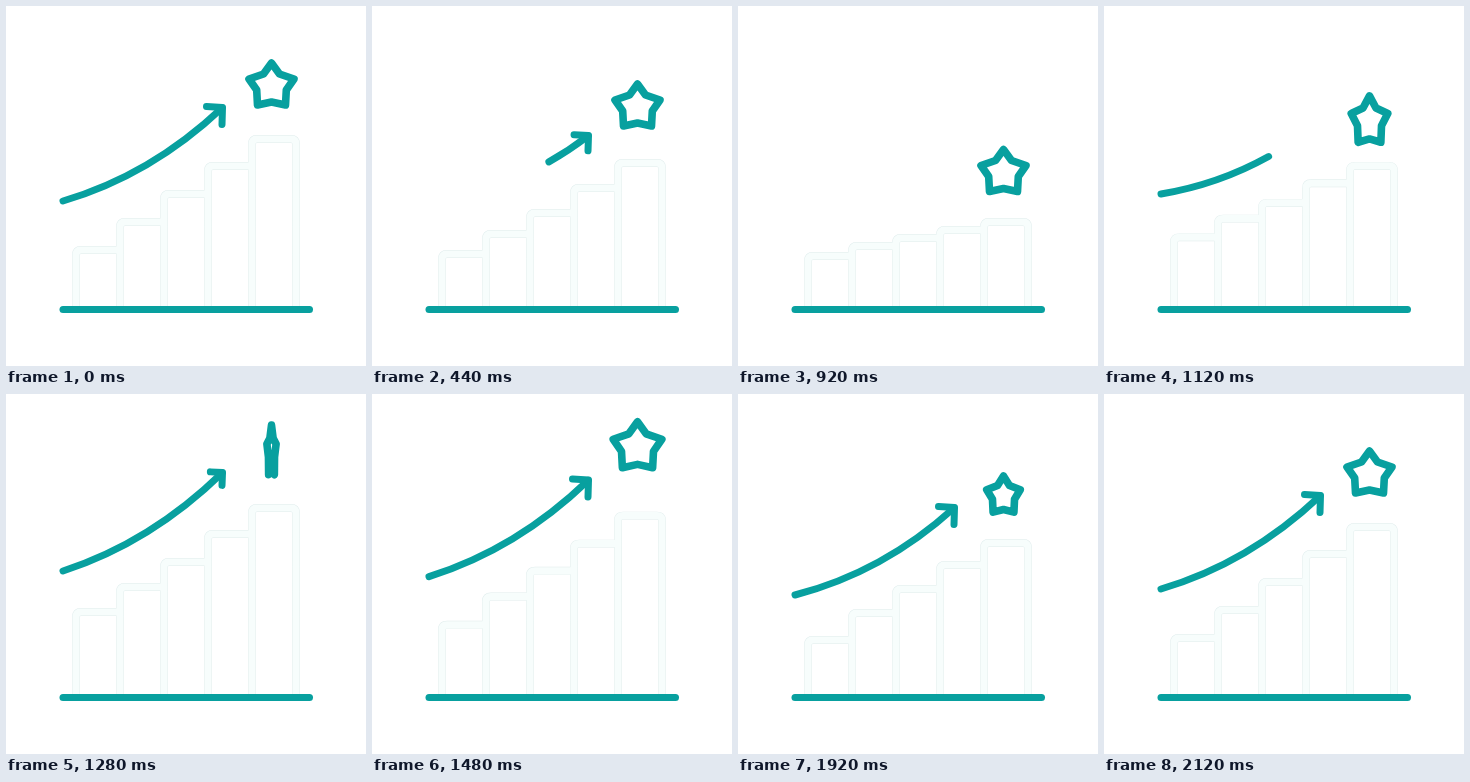
An HTML page for the animation above (2.32 s loop, 360 by 360 pixels).

```html
<!DOCTYPE html>
<html lang="en">
<head>
<meta charset="utf-8">
<title>Growth chart</title>
<style>
  html, body { margin: 0; width: 100%; height: 100%; overflow: hidden; background: #fff; }
  svg { display: block; width: 100%; height: 100%; }
  path { fill: none; stroke: #08a09f; stroke-width: 7; stroke-linecap: round; stroke-linejoin: round; }
  #edge { stroke: #dfecec; stroke-width: 7.8; stroke-linecap: butt; }
  #bars { stroke: #f7fdfc; stroke-linecap: butt; }
  #star { stroke-width: 7.6; }
</style>
</head>
<body>
<svg viewBox="0 0 360 360">
  <path id="edge"/>
  <path id="bars"/>
  <path d="M57 303.5H303.5"/>
  <path id="line" pathLength="1"/>
  <path id="head"/>
  <path id="star"/>
</svg>
<script>
const LOOP = 2320, STEP = 40;
const TIMES = [160, 440, 920, 1280, 1360, 1640, 1780, 1920, 2120];

// Vertical offsets of the bar tops at TIMES
const BARS = [
  [0, 4, 6, -26, -24, 1, 3, 2, 0],
  [0, 12, 24, -23, -23, 3, 5, 3, 0],
  [0, 19, 44, -20, -22, 7, 9, 7, 0],
  [0, 22, 64, -20, -22, 10, 13, 11, 0],
  [0, 24, 83, -19, -22, 10, 17, 16, 0]
];
const TOPS = [244, 216, 188, 160, 133];
const TAIL = [0, 0, 6, -18, -19, 1, 5, 6, 0];
const TIP = [0, 28, 62, -23, -24, 3, 11, 12, 0];
const STAR_Y = [78.5, 99.5, 165, 56.5, 40.5, 77.5, 95, 100.5, 78.5];
const STRETCH = [1, 1, 1, 1.18, 1.15, 1, 0.9, 0.86, 1];
const SPIN = [0, 0, 0, 100, 129, 229, 279, 330, 360];

// Right half of the star, top to bottom, around its centre
const HALF = [[0, -21.5], [8, -10.5], [22.5, -5.5], [14.8, 5.5], [14, 20.5], [0, 17.5]];
const STAR = [...HALF, ...HALF.slice(1, 5).reverse().map(([x, y]) => [-x, y])];

const $ = id => document.getElementById(id);
const clamp = v => Math.min(1, Math.max(0, v));
const ramp = (t, a, b) => clamp((t - a) / (b - a));
const smooth = p => p * p * (3 - 2 * p);

// Monotone cubic interpolation
function track(vals, t) {
  const n = TIMES.length - 1;
  if (t <= TIMES[0]) return vals[0];
  if (t >= TIMES[n]) return vals[n];
  const rate = i => (vals[i + 1] - vals[i]) / (TIMES[i + 1] - TIMES[i]);
  const slope = i => {
    if (i === 0 || i === n) return 0;
    const a = rate(i - 1), b = rate(i);
    return a * b <= 0 ? 0 : 2 * a * b / (a + b);
  };
  let i = 0;
  while (t > TIMES[i + 1]) i++;
  const h = TIMES[i + 1] - TIMES[i], p = (t - TIMES[i]) / h, q = 1 - p;
  return vals[i] * (1 + 2 * p) * q * q + slope(i) * h * p * q * q
    + vals[i + 1] * p * p * (3 - 2 * p) - slope(i + 1) * h * p * p * q;
}

function drawBars(t) {
  const d = BARS.map((offsets, i) => {
    const x = 70 + 44 * i, y = TOPS[i] + track(offsets, t);
    const start = `M${x} 301V${y + 5}Q${x} ${y} ${x + 5} ${y}`;
    return i < 4 ? `${start}H${x + 41}` : `${start}H${x + 39}Q${x + 44} ${y} ${x + 44} ${y + 5}V301`;
  }).join('');
  $('edge').setAttribute('d', d);
  $('bars').setAttribute('d', d);
}

function drawArrow(t) {
  const a = track(TAIL, t), b = track(TIP, t);
  const tipY = 102 + b;
  $('line').setAttribute('d', `M57 ${195 + a}Q145 ${169 + a + (b - a) * 0.55} 216 ${tipY}`);

  const growing = t > 900;
  const from = growing ? 0 : 0.73 * ramp(t, 160, 440) + 0.27 * ramp(t, 440, 560);
  const to = growing ? smooth(ramp(t, 940, 1240)) : 1;
  const len = to - from;
  $('line').style.display = len > 0.005 ? '' : 'none';
  $('line').setAttribute('stroke-dasharray', `${len} 3`);
  $('line').setAttribute('stroke-dashoffset', -from);

  const size = growing ? 0.75 * ramp(t, 1140, 1280) + 0.25 * ramp(t, 1280, 1400)
    : 1 - 0.1 * ramp(t, 160, 440) - 0.9 * ramp(t, 440, 600);
  $('head').style.display = size > 0.01 ? '' : 'none';
  $('head').setAttribute('d', `M${216 - 15.5 * size} ${tipY - 1.5 * size}L216.5 ${tipY - 0.5}L216 ${tipY + 16.5 * size}`);
}

function drawStar(t) {
  const cy = track(STAR_Y, t), sy = track(STRETCH, t);
  const sx = sy * Math.cos(track(SPIN, t) * Math.PI / 180);
  $('star').setAttribute('d', 'M' + STAR.map(([x, y]) => `${265.5 + x * sx} ${cy + y * sy}`).join('L') + 'Z');
}

function draw(now) {
  const t = Math.floor((now % LOOP) / STEP) * STEP;
  drawBars(t);
  drawArrow(t);
  drawStar(t);
}

const begin = performance.now();
function tick() {
  draw(performance.now() - begin);
  requestAnimationFrame(tick);
}
tick();
</script>
</body>
</html>
```
